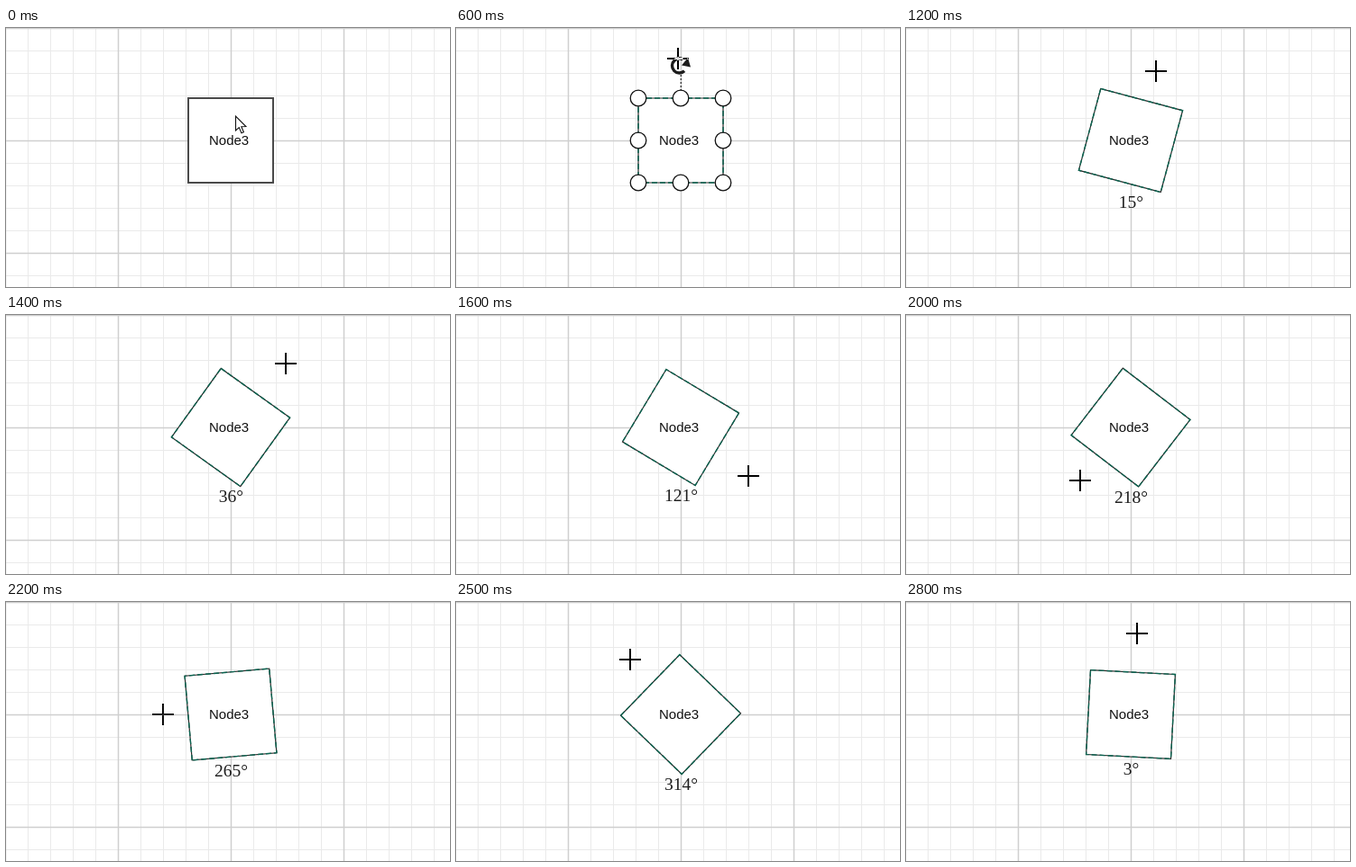
Animation of 492x288 px, one loop 2900 ms. Source, as an HTML page with a canvas:

```html
<!DOCTYPE html>
<html lang="en">
<head>
<meta charset="utf-8">
<title>Rotating a node</title>
<style>
  html, body { margin: 0; width: 100%; height: 100%; overflow: hidden; background: #fff; }
  canvas { display: block; }
</style>
</head>
<body>
<canvas id="stage" width="492" height="288"></canvas>
<script>
const W = 492, H = 288, LOOP = 2900, STEP = 100;
const SELECT = 200, GRAB = 600, ROTATE = 1000;
const CX = 249, CY = 125, HALF = 47;
const ctx = document.getElementById('stage').getContext('2d');

// The drag around the node; lead is how far the pointer runs ahead of the node
const drag = [
  { t: 1000, deg: 1, radius: 91, lead: 0 },
  { t: 1200, deg: 15, radius: 82, lead: 5 },
  { t: 1500, deg: 46, radius: 100, lead: 5 },
  { t: 1600, deg: 121, radius: 92.4, lead: 5 },
  { t: 1800, deg: 170, radius: 88, lead: 6.7 },
  { t: 2200, deg: 265, radius: 75, lead: 5 },
  { t: 2800, deg: 363, radius: 90.3, lead: 1.4 }
];

const rad = deg => deg * Math.PI / 180;
const mix = (a, b, k) => a + (b - a) * k;
const clamp = k => Math.min(1, Math.max(0, k));

function dragAt(t) {
  const i = Math.max(1, drag.findIndex(key => key.t >= t));
  const a = drag[i - 1], b = drag[i];
  const k = (t - a.t) / (b.t - a.t);
  const deg = mix(a.deg, b.deg, k);
  const r = mix(a.radius, b.radius, k);
  const dir = rad(deg + mix(a.lead, b.lead, k));
  return { deg, x: CX + r * Math.sin(dir), y: CY - r * Math.cos(dir) };
}

// The pointer lifts from the node to the rotate handle
function reachAt(t) {
  const k = clamp((t - SELECT) / (GRAB - SELECT));
  return { deg: 0, x: mix(254.5, 246, k), y: mix(98, 34, k) };
}

function line(x1, y1, x2, y2) {
  ctx.beginPath();
  ctx.moveTo(x1, y1);
  ctx.lineTo(x2, y2);
  ctx.stroke();
}

function polygon(points) {
  ctx.beginPath();
  points.forEach(([x, y]) => ctx.lineTo(x, y));
  ctx.closePath();
}

function pen(color, width, dash = []) {
  ctx.strokeStyle = color;
  ctx.lineWidth = width;
  ctx.setLineDash(dash);
}

function gridLines(major) {
  if (major) pen('#cfcfcf', 1.5);
  else pen('#eaeaea', 1);
  for (let i = 0; i < 20; i++) {
    if ((i % 5 === 0) !== major) continue;
    const p = i * 25;
    line(p - 0.5, 0, p - 0.5, H);
    line(0, p + 0.5, W, p + 0.5);
  }
}

function node(deg, selected) {
  ctx.save();
  ctx.translate(CX, CY);
  ctx.rotate(rad(deg));
  ctx.fillStyle = '#fff';
  ctx.beginPath();
  ctx.rect(-HALF, -HALF, HALF * 2, HALF * 2);
  ctx.fill();
  pen(selected ? '#2a2a2a' : '#4a4a4a', selected ? 1.2 : 2);
  ctx.stroke();
  if (selected) {
    pen('#0b6450', 1.4, [6, 3]);
    ctx.stroke();
  }
  ctx.restore();
  ctx.fillStyle = '#111';
  ctx.textAlign = 'left';
  ctx.font = '15px "Liberation Sans", Arial, sans-serif';
  ctx.fillText('Node3', 225, 130);
}

function rotateHandle() {
  pen('#333', 1.3, [2, 2]);
  line(CX + 0.3, 52, CX + 0.3, 69);
  pen('#1c1c1c', 3.4);
  ctx.beginPath();
  ctx.arc(247.5, 42, 8, 0.8, 5.2);
  ctx.stroke();
  ctx.fillStyle = '#1c1c1c';
  polygon([[257, 33], [260, 43.5], [250, 41.5]]);
  ctx.fill();
}

function resizeHandles() {
  ctx.fillStyle = '#fff';
  pen('#111', 1.3);
  for (let i = -1; i <= 1; i++) {
    for (let j = -1; j <= 1; j++) {
      if (!i && !j) continue;
      ctx.beginPath();
      ctx.arc(CX + i * HALF, CY + j * HALF, 8.8, 0, Math.PI * 2);
      ctx.fill();
      ctx.stroke();
    }
  }
}

function angleLabel(deg) {
  const r = rad(deg);
  const reach = HALF * (Math.abs(Math.cos(r)) + Math.abs(Math.sin(r)));
  ctx.fillStyle = '#1c1c1c';
  ctx.textAlign = 'center';
  ctx.font = '19.5px "Liberation Serif", "Times New Roman", serif';
  ctx.fillText(Math.round(deg) % 360 + '°', CX + 0.5, Math.round(CY + reach + 17.75));
}

function arrow(x, y) {
  ctx.save();
  ctx.translate(x, y);
  polygon([[0, 0], [0, 16], [3.8, 12.6], [6.4, 18.8], [8.9, 17.7], [6.3, 11.7], [11.4, 11.5]]);
  ctx.fillStyle = '#fff';
  ctx.fill();
  pen('#111', 1.1);
  ctx.stroke();
  ctx.restore();
}

// Inverts whatever lies below it
function crosshair(x, y) {
  x = Math.round(x);
  y = Math.round(y);
  ctx.save();
  ctx.globalCompositeOperation = 'difference';
  ctx.fillStyle = '#fff';
  ctx.fillRect(x - 12, y - 1, 24, 2);
  ctx.fillRect(x - 1, y - 12, 2, 11);
  ctx.fillRect(x - 1, y + 1, 2, 11);
  ctx.restore();
}

function draw(t) {
  const rotating = t >= ROTATE, selected = t >= SELECT;
  const { deg, x, y } = rotating ? dragAt(t) : reachAt(t);
  ctx.fillStyle = '#fff';
  ctx.fillRect(0, 0, W, H);
  gridLines(false);
  gridLines(true);
  node(deg, selected);
  if (rotating) {
    angleLabel(deg);
  } else if (selected) {
    rotateHandle();
    resizeHandles();
  }
  if (y < 52 || rotating) crosshair(x, y);
  else arrow(x, y);
}

const start = performance.now();
function tick() {
  const t = (performance.now() - start) % LOOP;
  draw(Math.floor(t / STEP) * STEP);
  requestAnimationFrame(tick);
}
draw(0);
requestAnimationFrame(tick);
</script>
</body>
</html>
```
